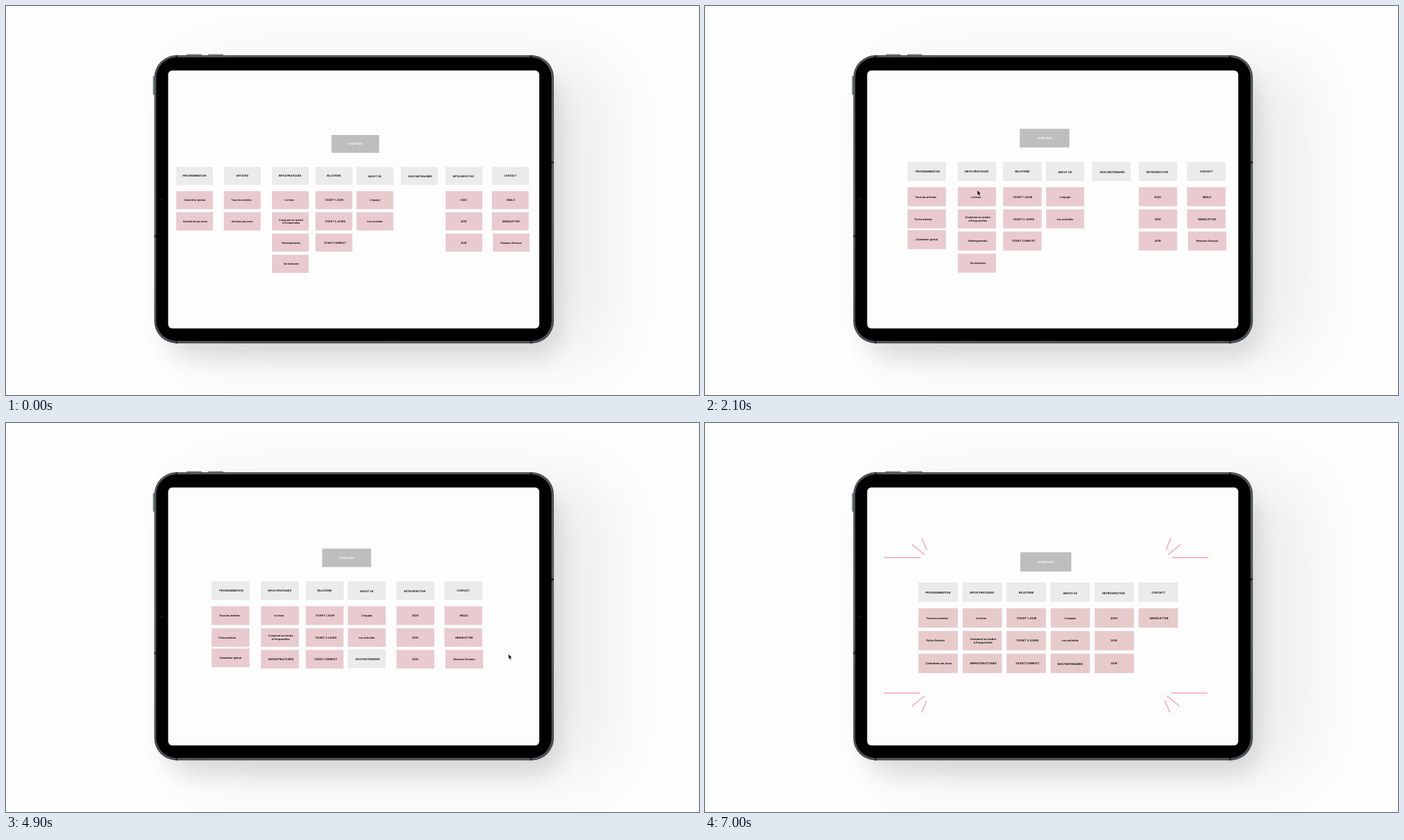
Recreate the animation shown at these times as an HTML page. Size 998 by 561 pixels, loop 7.7 s.

```html
<!DOCTYPE html>
<html lang="fr">
<head>
<meta charset="utf-8">
<title>Sitemap on a tablet</title>
<style>
  html, body { margin: 0; width: 100%; height: 100%; overflow: hidden; background: #fdfdfd; }
  svg { display: block; width: 998px; height: 561px; }
  text { font: 700 3.65px Inter, "Open Sans", sans-serif; text-anchor: middle; text-rendering: geometricPrecision; }
</style>
</head>
<body>
<svg viewBox="0 0 998 561" xmlns="http://www.w3.org/2000/svg">
  <defs>
    <filter id="near" x="-30%" y="-30%" width="160%" height="160%"><feGaussianBlur stdDeviation="16"/></filter>
    <filter id="far" x="-50%" y="-50%" width="200%" height="200%"><feGaussianBlur stdDeviation="50"/></filter>
    <linearGradient id="rim" x1="0" y1="0" x2="0" y2="1">
      <stop offset="0" stop-color="#59625f"/>
      <stop offset=".5" stop-color="#69716f"/>
      <stop offset="1" stop-color="#4d5554"/>
    </linearGradient>
  </defs>
  <rect width="998" height="561" fill="#fdfdfd"/>
  <rect x="265" y="85" width="600" height="420" rx="40" opacity=".065" filter="url(#far)"/>
  <rect x="232" y="100" width="565" height="407" rx="34" opacity=".11" filter="url(#near)"/>

  <g fill="#738089">
    <rect x="260" y="69.6" width="22" height="3" rx="1"/>
    <rect x="291" y="69.6" width="22" height="3" rx="1"/>
    <rect x="211.6" y="101" width="3" height="27" rx="1"/>
  </g>
  <rect x="213.5" y="71" width="575.5" height="415.5" rx="32" fill="url(#rim)"/>
  <rect x="214.6" y="72" width="573.3" height="413.5" rx="31" fill="none" stroke="#3a4140" stroke-width=".8"/>
  <g fill="#252a2a">
    <rect x="244" y="71" width="3" height="415.5"/>
    <rect x="754.5" y="71" width="3" height="415.5"/>
    <rect x="213.5" y="330.5" width="4" height="3"/>
    <rect x="785" y="224" width="4" height="3"/>
  </g>
  <rect x="216.3" y="74" width="569.4" height="409" rx="29" fill="#000"/>
  <circle cx="223.5" cy="279" r="1.6" fill="#10141a"/>
  <rect x="233.5" y="93" width="534.5" height="372" rx="6" fill="#fdfdfd"/>
  <g id="board"></g>
</svg>
<script>
const STEP = 700;
const BOX = { w: 52.4, h: 25.6 };
const GREY = '#ebebeb', PINK = '#e9cace';

// dx, dy shift the label; the options can shift the box or recolour it.
const cell = (label, dx = 0, dy = 0, opts = {}) => ({ label, dx, dy, ...opts });

const programme = cell('PROGRAMMATION', 1.3);
const allArtists = cell('Tous les artistes', -1.3);
const artistCard = cell('Fiche artistes', -4.5);
const daily = cell('Calendrier par jours', .7);
const globalCal = cell('Calendrier global');
const infos = cell('INFOS PRATIQUES', -.4);
const place = cell('Le lieux', -1.2);
const access = cell('Comment se rendre|à Porquerolles', 1.1);
const lodging = cell('Hebergements', 1.2);
const food = cell('Se restaurer', 1.4);
const facilities = cell('INFRASTRUCTURES', 1.4);
const partners = cell('NOS PARTENAIRES', 1.4, 1);
const mails = cell('MAILS', .8);
const news = cell('NEWSLETTER', 1, .2);
const social = cell('Reseaux Sociaux', 0, 0, { boxX: 1.3 });

const column = (x, ...cells) => ({ x, cells });
const tickets = x => column(x, cell('BILLETERIE'), cell('TICKET 1 JOUR', .4),
  cell('TICKET 3 JOURS', 1.7), cell('TICKET COMPLET', 1.6));
const about = (x, ...extra) => column(x, cell('ABOUT US', -.2, 1), cell("L'equipe"), cell('Les activités'), ...extra);
const retro = x => column(x, cell('RETROSPECTIVE', -.9, 1), cell('2020', -.4), cell('2019', -.4), cell('2018', -.4));
const contact = (x, ...cells) => column(x, cell('CONTACT'), ...cells);
const infoCol = (...cells) => column(69.3, infos, place, access, ...cells);

const artistCol = column(0, programme, allArtists, artistCard, { ...globalCal, boxY: -1.9 });
const wideTail = [tickets(132), about(191), column(255, partners), retro(319.3), contact(386, mails, news, social)];
const tightTail = (...cells) => [
  tickets(132),
  about(191, { ...partners, fill: GREY, boxY: -.7 }),
  retro(259.2),
  contact(326.3, ...cells)
];
const firstCol = (...cells) => column(-68.6, cell('PROGRAMMATION', -.2), ...cells);

const scene = (x, y, scale, cols, cursor, opts = {}) =>
  ({ x, y, scale, cols, cursor, homeX: 155, headY: 46, rowY: 81, pink: PINK, ...opts });

const fullInfo = infoCol(lodging, food);
const pitch = 59.25;
const finalCols = [
  column(0, cell('PROGRAMMATION', -.4), allArtists, cell('Fiche Artistes', -3.7), daily),
  column(pitch, infos, place, access, facilities),
  tickets(pitch * 2),
  about(pitch * 3, cell('NOS PARTENAIRES', 0, 1)),
  retro(pitch * 4),
  contact(pitch * 5, cell('NEWSLETTER', 1, .4))
];
const tidyInfo = infoCol(facilities);

const scenes = [
  scene(314, 186.2, 1, [firstCol(globalCal, daily),
    column(0, cell('ARTISTES'), allArtists, cell('Artistes par jours')), fullInfo, ...wideTail]),
  scene(312, 174.6, 1, [firstCol(globalCal),
    column(0, cell('ARTISTES'), allArtists, artistCard), fullInfo, ...wideTail], [300, 290]),
  scene(312.7, 174.6, 1, [firstCol(), artistCol, fullInfo, ...wideTail], [284.5, 253]),
  scene(292, 177.3, 1.043, [artistCol, fullInfo, ...wideTail], [392.4, 266]),
  scene(293, 178.4, 1.043, [artistCol, infoCol(lodging), ...wideTail], [410, 368]),
  scene(293.4, 178.5, 1.043, [artistCol, tidyInfo, ...wideTail], [463.8, 363.2]),
  scene(294, 179.5, 1.04, [artistCol, tidyInfo, tickets(132),
    about(191, { ...partners, fill: GREY }), retro(319.3), contact(386, mails, news, social)], [530, 345]),
  scene(296.3, 181.4, 1.028, [artistCol, tidyInfo, ...tightTail(mails, news, social)], [723.8, 333.5]),
  scene(296.5, 182, 1.026, [artistCol, tidyInfo, ...tightTail(mails, news)], [672, 330]),
  scene(296.9, 182.5, 1.025, [artistCol, tidyInfo, ...tightTail({ ...news, boxY: 1.2 })], [631, 314.5]),
  scene(307.8, 186.8, 1.07, finalCols, null,
    { homeX: 137, headY: 40.7, rowY: 75.4, pink: '#e7cbcb', rays: true })
];

const rect = (x, y, w, h, fill, stroke = 'none') =>
  `<rect x="${x}" y="${y}" width="${w}" height="${h}" fill="${fill}" stroke="${stroke}" stroke-width=".4"/>`;

function label(x, y, content, fill = '#111') {
  const lines = content.split('|');
  return lines.map((line, i) =>
    `<text x="${x}" y="${y + 1.4 + (i - (lines.length - 1) / 2) * 4.4}" fill="${fill}">${line}</text>`).join('');
}

function drawColumn({ x, cells }, { headY, rowY, pink }) {
  return cells.map((c, i) => {
    const left = x + (c.boxX || 0);
    const top = (i ? rowY + (i - 1) * 30.6 : headY) + (c.boxY || 0);
    const fill = c.fill || (i ? pink : GREY);
    return rect(left, top, BOX.w, BOX.h, fill, fill === GREY ? '#e0e0e0' : '#e2c1c5') +
      label(left + BOX.w / 2 + c.dx, top + BOX.h / 2 + c.dy, c.label);
  }).join('');
}

function drawRays() {
  const burst = '<path d="M258 194H310M298 175L316.3 190M312 166L319.3 183"/>';
  const corners = ['', 'translate(983) scale(-1 1)', 'translate(0 583.5) scale(1 -1)', 'translate(981.5 583.5) scale(-1)'];
  return '<g fill="none" stroke="#f2a4a6" stroke-width="1.4">' +
    corners.map(t => `<g transform="${t}">${burst}</g>`).join('') + '</g>';
}

const drawCursor = ([x, y]) =>
  `<path transform="translate(${x} ${y})" d="M0 0V6.6L1.5 5.2L2.6 7.8L3.7 7.3L2.6 4.8H4.6Z"
    fill="#111" stroke="#fff" stroke-width=".5" paint-order="stroke"/>`;

function drawScene(s) {
  const home = rect(s.homeX, 0, 68, 25.4, '#bebebe', '#b4b4b4') + label(s.homeX + 34, 12.8, 'HOME PAGE', '#f6f6f6');
  return `<g transform="translate(${s.x} ${s.y}) scale(${s.scale})">` +
    home + s.cols.map(c => drawColumn(c, s)).join('') + '</g>' +
    (s.rays ? drawRays() : '') + (s.cursor ? drawCursor(s.cursor) : '');
}

const board = document.getElementById('board');
let shown = -1;

function update(time) {
  const index = Math.floor(time / STEP) % scenes.length;
  if (index !== shown) {
    shown = index;
    board.innerHTML = drawScene(scenes[index]);
  }
}

const start = performance.now();
function tick() {
  update(performance.now() - start);
  requestAnimationFrame(tick);
}
tick();
</script>
</body>
</html>
```
